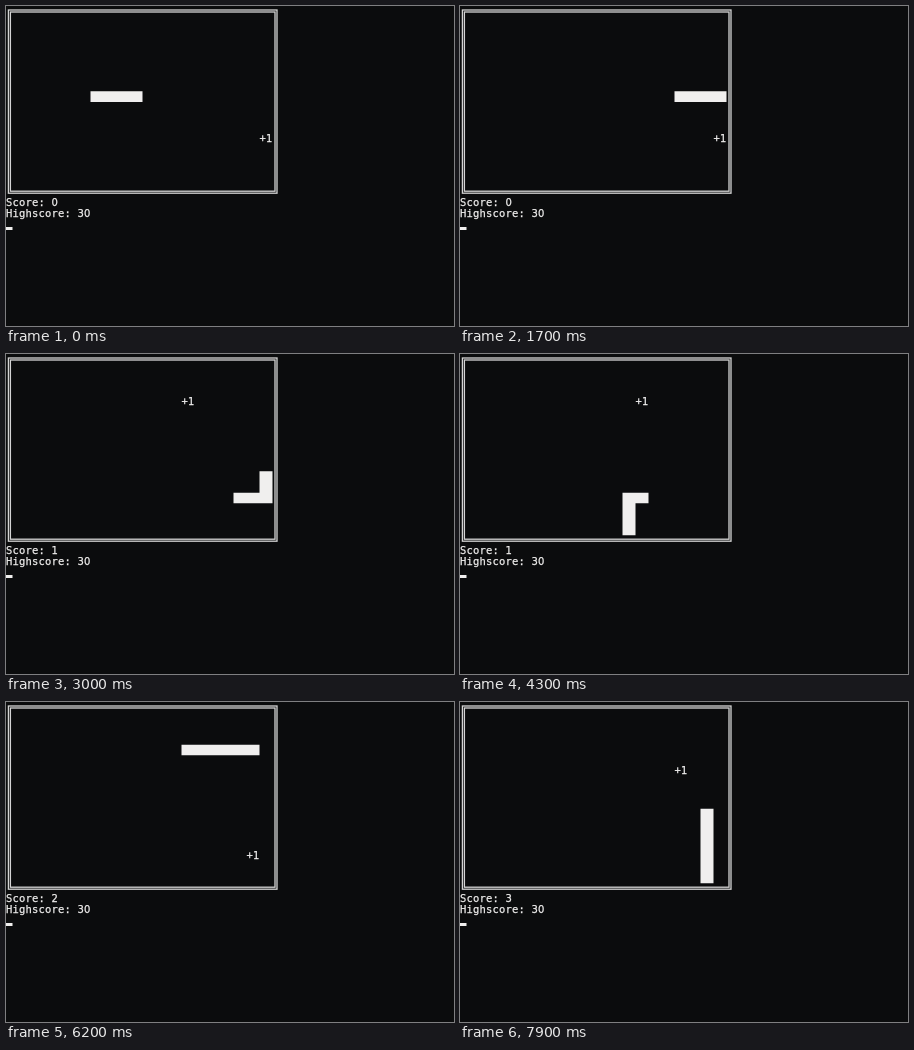
These frames come from a looping animation (448x320 px, 8 s). An HTML page with a canvas:

```html
<!DOCTYPE html>
<html>
<head>
<meta charset="utf-8">
<title>Console snake</title>
<style>
html, body { margin: 0; width: 100%; height: 100%; overflow: hidden; background: #0b0c0d; }
canvas { display: block; }
</style>
</head>
<body>
<canvas id="stage" width="448" height="320"></canvas>
<script>
const ctx = document.getElementById('stage').getContext('2d');
const LOOP = 8000, TICK = 100;          // the screen refreshes every TICK
const STEP = 177, LEAD = 144;           // one snake move, time already into it
const CHAR = 6.5, LINE = 32 / 3;        // console cell
const ROWS = 16, START_LEN = 4;
const BACK = '#0b0c0d', INK = '#f0efee', RULE = '#d4d4d4';

// Route: direction and number of moves; rows 1..16 wrap around.
const ROUTE = [[1, 0, 13], [0, 1, 5], [-1, 0, 7], [0, 1, 7], [1, 0, 6], [0, -1, 10]];
const FOODS = [[19, 12], [13, 4], [18, 14], [16, 6]];

const path = [[6, 8]];
for (const [dx, dy, count] of ROUTE) {
  for (let i = 0; i < count; i++) {
    const [x, y] = path[path.length - 1];
    path.push([x + dx, (y + dy - 1 + ROWS) % ROWS + 1]);
  }
}

// Path index at which each food is eaten
const meals = [];
path.forEach(([x, y], i) => {
  const [fx, fy] = FOODS[meals.length];
  if (x === fx && y === fy) meals.push(i);
});

// Digits use the proportional face for its plain zero.
function print(text, col, row) {
  [...text].forEach((ch, i) => {
    ctx.font = /\d/.test(ch) ? '10px "DejaVu Sans", sans-serif'
                             : '10.5px "DejaVu Sans Mono", monospace';
    const x = (col + i + 0.5) * CHAR, y = row * LINE + 8.1;
    ctx.fillText(ch, x, y);
    ctx.strokeText(ch, x, y);
  });
}

function frame(inset) {
  ctx.strokeRect(2.4 + inset, 4 + inset, 268.6 - 2 * inset, 183.2 - 2 * inset);
}

function draw(time) {
  const now = Math.floor(time % LOOP / TICK) * TICK;
  const head = START_LEN - 1 + Math.floor((now + LEAD) / STEP);
  const score = meals.filter(i => i <= head).length;
  const length = START_LEN + meals.filter(i => i < head).length;

  ctx.fillStyle = BACK;
  ctx.fillRect(0, 0, 448, 320);

  ctx.strokeStyle = RULE;
  ctx.lineWidth = 1.3;
  frame(0);
  frame(2);

  ctx.fillStyle = ctx.strokeStyle = INK;
  ctx.lineWidth = 0.25;
  ctx.textAlign = 'center';
  const [fx, fy] = FOODS[score];
  print('+1', 1 + 2 * fx, fy);
  print('Score: ' + score, 0, 18);
  print('Highscore: 30', 0, 19);
  ctx.fillRect(0, 221, CHAR, 3);

  ctx.beginPath();
  for (const [x, y] of path.slice(head - length + 1, head + 1)) {
    ctx.rect((1 + 2 * x) * CHAR, y * LINE, 2 * CHAR, LINE);
  }
  ctx.fill();
}

const start = performance.now();
function tick() {
  draw(performance.now() - start);
  requestAnimationFrame(tick);
}
tick();
</script>
</body>
</html>
```
